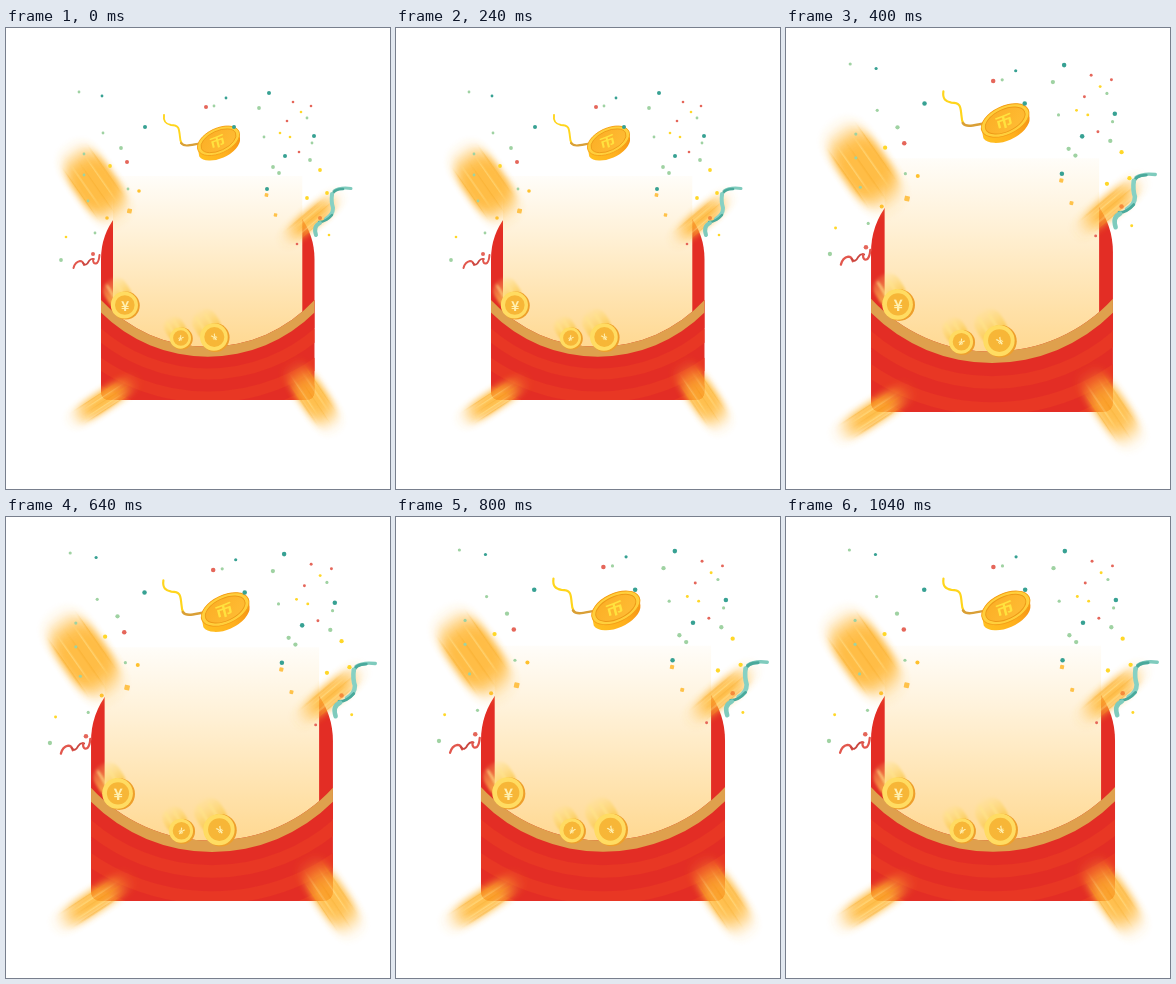
An HTML page for the animation above (1.2 s loop, 384x461 px).

```html
<!DOCTYPE html>
<html lang="zh">
<head>
<meta charset="utf-8">
<title>Red envelope</title>
<style>
  html, body { margin: 0; width: 100%; height: 100%; overflow: hidden; background: #fff; }
  svg { display: block; width: 384px; height: 461px; }
  text { text-anchor: middle; dominant-baseline: central; font-family: "Noto Sans CJK SC", "Noto Sans CJK", sans-serif; font-weight: 700; }
  .line { fill: none; stroke-linecap: round; stroke-linejoin: round; }
</style>
</head>
<body>
<svg viewBox="0 0 384 461">
  <defs>
    <linearGradient id="paper" x2="0" y2="1">
      <stop offset="0" stop-color="#fffdf9"/>
      <stop offset=".3" stop-color="#fff2da"/>
      <stop offset="1" stop-color="#ffd68a"/>
    </linearGradient>
    <linearGradient id="face" x2="1" y2="1">
      <stop offset="0" stop-color="#fbae25"/>
      <stop offset="1" stop-color="#ffbd35"/>
    </linearGradient>
    <linearGradient id="side">
      <stop offset="0" stop-color="#ffc021"/>
      <stop offset=".55" stop-color="#ffb01e"/>
      <stop offset="1" stop-color="#f58f12"/>
    </linearGradient>
    <linearGradient id="trail">
      <stop offset="0" stop-color="#ffe27a" stop-opacity=".15"/>
      <stop offset="1" stop-color="#f9bd35"/>
    </linearGradient>
    <filter id="smear" x="-60%" y="-80%" width="220%" height="260%"><feGaussianBlur stdDeviation="9 3.2"/></filter>
    <filter id="streak" x="-60%" y="-300%" width="220%" height="700%"><feGaussianBlur stdDeviation="6 .6"/></filter>
    <filter id="soft" x="-30%" y="-30%" width="160%" height="160%"><feGaussianBlur stdDeviation="1.6 .8"/></filter>
    <clipPath id="pocket">
      <path d="M95 284A151 151 0 0 0 308.5 284V363Q308.5 372 299.5 372H104Q95 372 95 363Z"/>
    </clipPath>
  </defs>

  <g id="envelope">
    <path fill="#e32d25" d="M95 300V231Q95 207 110 188H294Q308.5 207 308.5 231V300Z"/>
    <path fill="url(#paper)" d="M107 148H296.3V330H107Z"/>
    <path fill="#e32d25" d="M95 272A145 145 0 0 0 308.5 272V363Q308.5 372 299.5 372H104Q95 372 95 363Z"/>
    <g id="stripes" clip-path="url(#pocket)" fill="none" stroke="#e83724" stroke-width="11"></g>
    <path fill="#dfa04d" d="M95 272A145 145 0 0 0 308.5 272V284.5A151 151 0 0 1 95 284.5Z"/>
    <g id="coins"></g>
    <g id="smears"></g>
  </g>

  <g id="ribbons">
    <g class="line">
      <path stroke="#ffd51c" stroke-width="1.9" d="M158 87C157 94 160 96 165 97C174 97 173 102 174 109Q174 113 176 116"/>
      <path stroke="#d99f36" stroke-width="2.1" d="M175 115C179 120 187 116 197 115"/>
      <path stroke="#e2574d" stroke-width="2" d="M67.500 240Q69 234 74 233Q77 233 78 237"/>
      <path stroke="#c9463f" stroke-width="1.700" d="M77 235Q80 239 83 233Q85 230 88 231"/>
      <path stroke="#e2574d" stroke-width="2" d="M87 231Q87 237 91 235Q93 233 93.500 227"/>
      <path stroke="#7fcbbd" stroke-width="3" d="M345 160.500Q334 159 328 163"/>
      <path stroke="#4aa99b" stroke-width="2.500" d="M337 161Q327 161 326 168"/>
      <path stroke="#86d1c4" stroke-width="4" d="M326 166Q325 174 327 180Q327 187 320 191"/>
      <path stroke="#4aa99b" stroke-width="2.500" d="M326 187Q320 194 313 194"/>
      <path stroke="#7fcbbd" stroke-width="4" d="M314 195Q307 198 310 207"/>
    </g>
    <g transform="translate(212.500 112.800) rotate(-25)">
      <path fill="url(#side)" d="M-22.500 0A22.500 12.500 0 0 1 22.500 0L20.500 7A22.500 12.500 0 0 1 -24 6Z"/>
      <ellipse rx="22.500" ry="12.500" fill="#ffcf3c" stroke="#f5a018" stroke-width=".8"/>
      <ellipse rx="18.800" ry="9.800" fill="url(#face)" stroke="#ee9a18" stroke-width=".8"/>
      <text transform="translate(-1 -.5) scale(1 .75) rotate(8)" font-size="17" fill="#ffe23f">币</text>
    </g>
  </g>

  <g id="confetti"></g>
</svg>

<script>
const byId = id => document.getElementById(id);
const draw = (id, markup) => byId(id).insertAdjacentHTML("beforeend", markup);

for (let radius = 168; radius < 270; radius += 23)
  draw("stripes", `<circle cx="201.750" cy="178" r="${radius}"/>`);

function coin(x, y, r, tilt, glyph) {
  draw("coins", `<g transform="translate(${x} ${y})">
    <g transform="rotate(58)" filter="url(#soft)">
      <rect x="${-r * 2.1}" y="${-r * .9}" width="${r * 2.1}" height="${r * 1.8}" rx="${r * .8}" fill="url(#trail)"/>
      <path d="M${-r * 1.7} ${-r * .3}H0M${-r * 1.9} ${r * .35}H0" stroke="#ffe58a" stroke-width="1.500"/>
    </g>
    <circle cx=".8" cy=".6" r="${r}" fill="#ee9f2b"/>
    <circle cx="-.6" r="${r * .97}" fill="#ffdc62"/>
    <circle cx="-.2" r="${r * .7}" fill="#f7b637"/>
    <text transform="rotate(${tilt})" font-size="${glyph}" fill="#fff0b0">¥</text></g>`);
}
coin(119, 277, 14, 0, 14);
coin(175, 310, 11, 35, 8);
coin(208.5, 309, 14.3, -35, 9);

// Motion-blurred coins: a soft body with fine streaks along the direction of travel.
function smear(x, y, angle, length, width, opacity) {
  let streaks = "";
  for (let i = 0; i < 5; i++) {
    const offset = (i / 4 - .5) * width * .8;
    streaks += `<rect x="${-length * .4 + (i % 3) * 4}" y="${offset}" width="${length * .65}" height="1.300"
      fill="${i % 2 ? "#ffda78" : "#f9a91f"}" opacity=".65"/>`;
  }
  draw("smears", `<g transform="translate(${x} ${y}) rotate(${angle})" opacity="${opacity}">
    <rect x="${-length / 2}" y="${-width / 2}" width="${length}" height="${width}" rx="${width * .4}"
      fill="#ffb632" filter="url(#smear)"/>
    <g filter="url(#streak)">${streaks}</g></g>`);
}
smear(89, 156, 55, 66, 42, .9);
smear(306, 190, -40, 50, 19, .85);
smear(97, 373, -33, 54, 20, .85);
smear(307, 369, 56, 54, 28, .85);

// Small and large dots per colour, as "x,y" pairs.
const dots = [
  ["#37a193", 1.4, "96,68 220,70"],
  ["#37a193", 2, "139,99 228,99 263,65 308,108 279,128 261,161"],
  ["#9fd2a2", 1.4, "73,64 97,105 78,126 78,147 82,173 122,161 89,205 208,78 258,109 301,90 306,115"],
  ["#9fd2a2", 1.9, "115,120 55,232 253,80 304,132 267,139 273,145"],
  ["#e5665a", 1.3, "287,74 305,78 281,93 293,124 291,216"],
  ["#e5665a", 2, "121,134 87,226 200,79"],
  ["#ffd728", 1.3, "60,209 274,105 284,109 295,84 323,207"],
  ["#ffd728", 1.9, "104,138 314,142 301,170 321,165"],
  ["#ffc12e", 1.8, "133,163 101,190"],
  ["#f58a3c", 2, "314,190"]
];
for (const [color, r, places] of dots)
  for (const place of places.split(" ")) {
    const [x, y] = place.split(",");
    draw("confetti", `<circle cx="${x}" cy="${y}" r="${r}" fill="${color}"/>`);
  }
for (const [x, y, size] of [[123.500, 183, 4.6], [260.500, 167, 3.6], [269.500, 187, 3.4]])
  draw("confetti", `<rect x="${x - size / 2}" y="${y - size / 2}" width="${size}" height="${size}" rx=".7"
    fill="#ffc24a" transform="rotate(12 ${x} ${y})"/>`);

// Each layer holds one pose (scale x, scale y, shift x, shift y) per 400 ms step.
const STEP = 400;
const poses = {
  envelope: [[1, 1, 0, 0], [1.133, 1.133, -22.6, -37.5], [1.143, 1.139, -23.6, -39.7]],
  ribbons:  [[1, 1, 0, 0], [1.133, 1.133, -21.6, -35.3], [1.143, 1.139, -23.1, -37.6]],
  confetti: [[1, 1, 0, 0], [1.126, 1.131, -18, -36.4], [1.134, 1.137, -19.4, -39.8]]
};

const start = performance.now();
function render() {
  const step = Math.floor((performance.now() - start) / STEP) % 3;
  for (const layer in poses) {
    const [sx, sy, x, y] = poses[layer][step];
    byId(layer).setAttribute("transform", `matrix(${sx} 0 0 ${sy} ${x} ${y})`);
  }
  requestAnimationFrame(render);
}
render();
</script>
</body>
</html>
```
